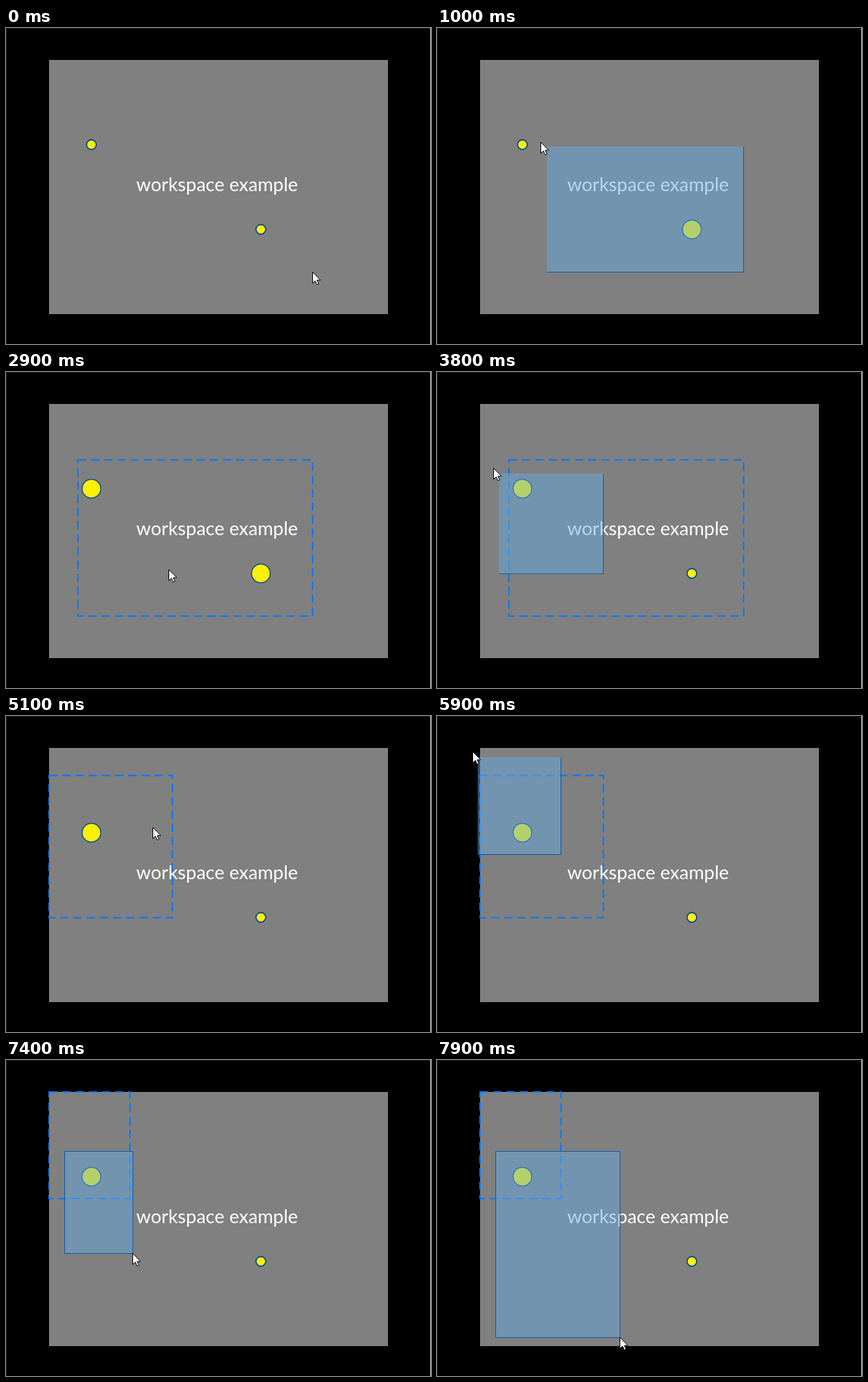
These frames come from a looping animation (612x455 px, 8000 ms). An HTML page:

```html
<!DOCTYPE html>
<html lang="en">
<head>
<meta charset="utf-8">
<title>Workspace selection</title>
<style>
  html, body { margin: 0; width: 100%; height: 100%; overflow: hidden; background: #000; }
  svg { display: block; }
  text { font: 27px Lato, "Open Sans", sans-serif; fill: #fff; }
  .dot { fill: #fff200; stroke: #0a4a9c; }
  #marked { fill: none; stroke: #0078ff; stroke-width: 2; stroke-dasharray: 12 7; }
  #fill { fill: rgba(98, 170, 226, .48); }
  #edge { fill: none; stroke: #0c5ba8; }
  #arrow { fill: #fff; stroke: #000; }
</style>
</head>
<body>
<svg width="612" height="455" viewBox="0 0 612 455">
  <rect width="612" height="455"/>
  <path d="M0 .5H611M.5 0V455" stroke="#1c1c1c"/>
  <rect x="611" width="1" height="455" fill="#ddd"/>
  <rect x="62" y="46" width="488" height="366" fill="#808080"/>
  <text x="187.5" y="235">workspace example</text>
  <circle class="dot" cx="123" cy="168"/>
  <circle class="dot" cx="367" cy="290"/>
  <path id="marked"/>
  <path id="fill"/>
  <path id="edge"/>
  <path id="arrow" d="M.5 .5V16.5L4.2 13L6.8 18.6L9.3 17.5L6.8 12H11.8Z"/>
</svg>
<script>
const LOOP = 8000, STEP = 100, LAG = 11;
const WORK = { left: 62, top: 46 };
const $ = id => document.getElementById(id);
const dots = [...document.querySelectorAll('.dot')];

// Pointer moves; those with a release time drag a selection band.
const moves = [
  { start: 300, end: 1270, x: 103, y: 126, bow: -13, release: 2000 },
  { start: 2100, end: 3000, x: 239, y: 290 },
  { start: 3100, end: 4250, x: 34, y: 85, bow: -6, release: 4500 },
  { start: 4600, end: 5100, x: 211, y: 160 },
  { start: 5100, end: 5300, x: 178, y: 199 },
  { start: 5300, end: 6250, x: 15, y: 8, release: 6500 },
  { start: 6500, end: 7000, x: 84, y: 131 },
  { start: 7050, end: 7900, x: 263, y: 399, release: 8100 }
];
moves.forEach((m, i) => { m.from = moves[i - 1] || { x: 441, y: 351 }; });

const ease = k => 1 - (1 - k) ** 1.5;

function pointer(t) {
  const m = moves.filter(m => t >= m.start).pop();
  if (!m) return moves[0].from;
  const k = ease(Math.min(1, (t - m.start) / (m.end - m.start)));
  const dx = m.x - m.from.x, dy = m.y - m.from.y;
  const side = (m.bow || 0) * 4 * k * (1 - k) / Math.hypot(dx, dy);
  return { x: m.from.x + dx * k - dy * side, y: m.from.y + dy * k + dx * side };
}

// Pulls a point back towards its anchor.
function pull(p, anchor, dist) {
  const dx = p.x - anchor.x, dy = p.y - anchor.y;
  const k = Math.max(0, 1 - dist / (Math.hypot(dx, dy) || 1));
  return { x: anchor.x + dx * k, y: anchor.y + dy * k };
}

function box(a, b) {
  return {
    left: Math.min(a.x, b.x), top: Math.min(a.y, b.y),
    right: Math.max(a.x, b.x) + 1, bottom: Math.max(a.y, b.y) + 1
  };
}

const outline = b => `M${b.left} ${b.top}H${b.right}V${b.bottom}H${b.left}Z`;
const inset = (b, d) => ({ left: b.left + d, top: b.top + d, right: b.right - d, bottom: b.bottom - d });

function touches(b, dot) {
  const x = +dot.getAttribute('cx'), y = +dot.getAttribute('cy'), r = 7;
  return b.left < x + r && b.right > x - r && b.top < y + r && b.bottom > y - r;
}

function draw(t) {
  const tip = pointer(t);
  const drag = moves.find(m => t >= m.start && t < m.release);
  const last = moves.filter(m => t >= m.release).pop();
  const done = last && inset(box(last.from, last), .5);

  let live = null, fill = '', edge = '';
  if (drag) {
    // Moving up and left, the band trails the pointer and lacks its leading edges.
    const trailing = drag.x < drag.from.x && t < drag.end;
    live = box(drag.from, trailing ? pull(tip, drag.from, LAG) : tip);
    fill = outline(live);
    const e = inset(live, .5);
    edge = trailing ? `M${e.right} ${e.top}V${e.bottom}H${e.left}` : outline(e);
  }
  $('fill').setAttribute('d', fill);
  $('edge').setAttribute('d', edge);

  $('marked').setAttribute('d', done ? outline({
    ...done,
    left: Math.max(done.left, WORK.left), top: Math.max(done.top, WORK.top)
  }) : '');

  const active = live || done;
  for (const dot of dots) {
    const on = active && touches(active, dot);
    dot.setAttribute('r', on ? 13.5 : 7);
    dot.setAttribute('stroke-width', on ? 1.5 : 1.8);
  }
  $('arrow').setAttribute('transform', `translate(${Math.round(tip.x)} ${Math.round(tip.y)})`);
}

const start = performance.now();
function tick() {
  const t = (performance.now() - start) % LOOP;
  draw(Math.floor(t / STEP) * STEP);
  requestAnimationFrame(tick);
}
tick();
</script>
</body>
</html>
```
